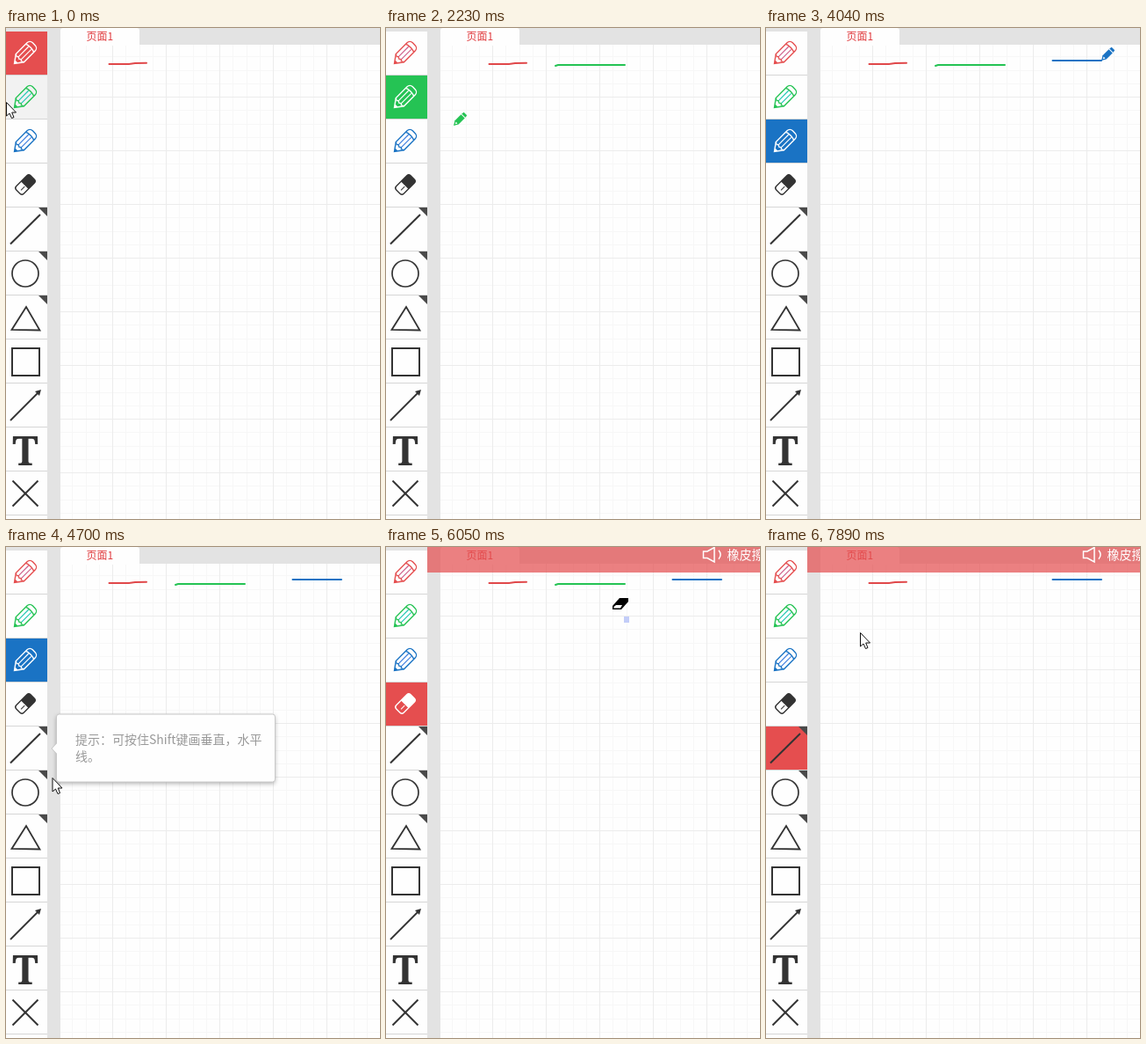
An HTML page with a canvas that plays this animation: 426x558 px, repeating every 8000 ms.

```html
<!DOCTYPE html>
<html lang="zh-CN">
<head>
<meta charset="utf-8">
<title>画板工具</title>
<style>
html, body { margin: 0; width: 100%; height: 100%; overflow: hidden; background: #e3e3e3; }
canvas { display: block; }
</style>
</head>
<body>
<canvas id="stage" width="426" height="558"></canvas>
<script>
const ctx = document.getElementById('stage').getContext('2d');
const LOOP = 8000, FIRST_STEP = 310, STEP = 136.4;
const RED = '#e54e4f', GREEN = '#25c354', BLUE = '#1a73c4', DARK = '#333';
const CJK = '"Noto Sans CJK SC", "Noto Sans CJK", sans-serif';

// Moments of the story, counted in steps
const PICK_GREEN = 2, GREEN_START = 8, GREEN_END = 12, PICK_BLUE = 18, BLUE_START = 24, BLUE_END = 28,
      HOVER_LINE = 32, PICK_ERASER = 38, ERASE = 45, HOVER_AGAIN = 48, PICK_LINE = 51;

// Places the pointer passes; it eases from one to the next
const stops = [
  { step: 0, x: 0, y: 84 },
  { step: PICK_GREEN, x: 14, y: 84 },
  { step: GREEN_START, x: 193, y: 42 },
  { step: GREEN_END, x: 272, y: 42 },
  { step: 13, x: 320, y: 55 },
  { step: 15, x: 77, y: 111 },
  { step: PICK_BLUE, x: 30, y: 132 },
  { step: 22, x: 347, y: 35 },
  { step: BLUE_START, x: 326, y: 37 },
  { step: BLUE_END, x: 382, y: 37 },
  { step: HOVER_LINE, x: 42, y: 226 },
  { step: 33, x: 52.5, y: 262 },
  { step: 35, x: 56, y: 364 },
  { step: PICK_ERASER, x: 30, y: 182 },
  { step: 43, x: 267, y: 65 },
  { step: ERASE, x: 258, y: 45 },
  { step: 49, x: 36, y: 243 },
  { step: PICK_LINE, x: 34, y: 236 },
  { step: 56, x: 107, y: 97 }
];

const clamp = v => Math.min(1, Math.max(0, v));
const smooth = p => p * p * (3 - 2 * p);

function pointerAt(step) {
  const i = stops.findIndex(s => s.step > step);
  if (i < 0) return stops[stops.length - 1];
  const a = stops[i - 1], b = stops[i];
  const p = smooth((step - a.step) / (b.step - a.step));
  return { x: a.x + (b.x - a.x) * p, y: a.y + (b.y - a.y) * p };
}

// Opacity of something that fades in and out over one step
const visible = (step, from, to) => clamp(Math.min(step - from, to - step));

function rect(x, y, w, h, color) {
  ctx.fillStyle = color;
  ctx.fillRect(x, y, w, h);
}

function trace(points, closed) {
  ctx.beginPath();
  points.forEach(([x, y]) => ctx.lineTo(x, y));
  if (closed) ctx.closePath();
}

function stroke(color, width) {
  ctx.strokeStyle = color;
  ctx.lineWidth = width;
  ctx.stroke();
}

function line(points, color, width = 2, closed = false) {
  trace(points, closed);
  stroke(color, width);
}

function polygon(points, color) {
  trace(points, true);
  ctx.fillStyle = color;
  ctx.fill();
}

function roundBox(x, y, w, h, radius, color) {
  ctx.beginPath();
  ctx.roundRect(x, y, w, h, radius);
  ctx.fillStyle = color;
  ctx.fill();
}

function text(str, x, y, font, color) {
  ctx.font = font;
  ctx.fillStyle = color;
  ctx.fillText(str, x, y);
}

function placed(x, y, angle, draw) {
  ctx.save();
  ctx.translate(x, y);
  ctx.rotate(angle);
  draw();
  ctx.restore();
}

function drawGrid(gap, color) {
  for (let x = 121 - 61; x < 426; x += gap) if (x > 62) rect(Math.round(x), 19, 1, 539, color);
  for (let y = 78 - 61; y < 558; y += gap) if (y > 19) rect(62, Math.round(y), 364, 1, color);
}

function drawPage() {
  rect(0, 0, 426, 558, '#e3e3e3');
  rect(62, 19, 364, 539, '#fefefe');
  drawGrid(15.25, '#f7f7f7');
  drawGrid(61, '#ececec');
  roundBox(62, 0, 90, 20, [3, 3, 0, 0], '#fefefe');
  text('页面1', 91.5, 13.5, '12px ' + CJK, '#e0393c');
}

function pencilIcon(y, color, inner) {
  placed(9.5, y + 12.5, -Math.PI / 4, () => {
    for (const v of [-2.2, 2.2]) line([[9, v], [25, v]], inner, 1.2);
    line([[9, -6.5], [7.5, -3.5], [9, -2.2], [7.5, 0], [9, 2.2], [7.5, 3.5], [9, 6.5]], color, 1.2);
    ctx.beginPath();
    ctx.moveTo(0, 0);
    ctx.lineTo(9, -6.5);
    ctx.arcTo(31.5, -6.5, 31.5, 0, 4.5);
    ctx.arcTo(31.5, 6.5, 9, 6.5, 4.5);
    ctx.lineTo(9, 6.5);
    ctx.closePath();
    ctx.moveTo(25, -6.5);
    ctx.quadraticCurveTo(27, 0, 25, 6.5);
    stroke(color, 1.4);
    polygon([[0, 0], [3.5, -2.3], [3.5, 2.3]], color);
  });
}

function eraserIcon(color, fill) {
  placed(22, 178, -Math.PI / 4, () => {
    roundBox(-11.5, -6, 23, 12, 3, fill);
    stroke(color, 1.4);
    roundBox(-1, -6, 12.5, 12, [0, 3, 3, 0], color);
    line([[-8, 1], [-2, 1]], color, 1);
  });
}

function drawToolbar(selected, hovered) {
  const pens = [RED, GREEN, BLUE], inners = ['#d0608c', '#25c8b4', '#3f7fe0'];
  rect(0, 4, 47, 554, '#fefefe');
  if (hovered >= 0) rect(0, 4 + hovered * 50, 47, 49, '#f2f2f2');
  rect(0, 4 + selected * 50, 47, 49, pens[selected] || RED);
  for (let i = 1; i < 12; i++) rect(0, 3 + i * 50, 47, 1, '#d6d6d6');

  pens.forEach((color, i) => {
    const on = selected === i;
    pencilIcon(28 + i * 50, on ? '#fff' : color, on ? '#fff' : inners[i]);
  });
  eraserIcon(selected === 3 ? '#fff' : DARK, selected === 3 ? RED : '#fff');
  for (const y of [204, 254, 304]) polygon([[37, y], [47, y], [47, y + 10]], '#4a4a4a');

  line([[5, 245.5], [39, 212]], DARK);
  ctx.beginPath();
  ctx.arc(22, 279, 15, 0, Math.PI * 2);
  stroke(DARK, 1.7);
  line([[23, 317], [38.5, 343.5], [6.5, 343]], DARK, 1.8, true);
  line([[7, 364], [38, 364], [38, 395], [7, 395]], DARK, 2, true);
  line([[5, 446], [37, 414]], DARK, 1.8);
  polygon([[40, 411], [38, 418], [33, 413]], DARK);
  ctx.textAlign = 'center';
  text('T', 22, 496.5, 'bold 45px "Noto Serif", serif', DARK);
  ctx.textAlign = 'left';
  line([[7.5, 514.5], [36.5, 543.5]], DARK);
  line([[36.5, 514.5], [7.5, 543.5]], DARK);
}

function drawStrokes(step) {
  const penX = end => pointerAt(Math.min(step, end)).x;
  ctx.save();
  ctx.lineCap = 'round';
  line([[117.5, 41], [140, 41], [147, 40], [160, 39.8]], '#e0484a');
  if (step > GREEN_START && step < ERASE) line([[193, 43], [196, 42], [penX(GREEN_END), 42]], GREEN);
  if (step > BLUE_START) line([[326.5, 37], [penX(BLUE_END), 37]], BLUE);
  ctx.restore();
}

function drawBanner(step) {
  const shown = clamp((step - PICK_ERASER) / 2);
  placed(0, -29 * (1 - shown), 0, () => {
    rect(47, 0, 379, 29, 'rgba(229,78,79,.71)');
    line([[361.5, 5], [366, 5], [374, .5], [374, 17], [366, 12.5], [361.5, 12.5]], '#fff', 1.5, true);
    ctx.beginPath();
    ctx.arc(374, 8.7, 7, -.8, .8);
    ctx.stroke();
    text('橡皮擦', 388.5, 14, '14px ' + CJK, '#fff');
  });
}

function drawTip(amount) {
  if (amount <= 0) return;
  const scale = .88 + .12 * amount;
  placed(57, 229, 0, () => {
    ctx.scale(scale, scale);
    ctx.shadowColor = 'rgba(0,0,0,.3)';
    ctx.shadowBlur = 5;
    ctx.shadowOffsetY = 2;
    roundBox(.5, -39, 249, 77, 3, '#fefefe');
    ctx.shadowColor = 'transparent';
    stroke('#c8c8c8', 1);
    polygon([[2, -7], [-5, 0], [2, 7]], '#fefefe');
    line([[.5, -6], [-5, 0], [.5, 6]], '#c8c8c8', 1);
    ctx.globalAlpha = amount * amount;
    text('提示：可按住Shift键画垂直，水平', 22, -5, '14px ' + CJK, '#999');
    text('线。', 22, 14, '14px ' + CJK, '#999');
  });
}

function outlined(points) {
  polygon(points, '#fff');
  line(points, '#111', 1, true);
}

const cursors = {
  arrow() {
    outlined([[.5, .5], [.5, 16], [4, 13], [6.5, 18.5], [9, 17.5], [6.7, 12], [11.5, 12]]);
  },
  hand() {
    outlined([[-1.5, 1.5], [0, .5], [1.5, 1.5], [1.5, 8], [9, 10], [9.5, 17], [7.5, 23.5],
              [-2, 23.5], [-7, 13], [-5.5, 11.5], [-1.5, 15]]);
    for (const x of [2, 4.5, 7]) line([[x, 8.5], [x, 12]], '#111', 1);
  },
  pencil(color) {
    ctx.rotate(-Math.PI / 4);
    polygon([[0, 0], [5, -3], [15, -3], [15, 3], [5, 3]], color);
    polygon([[16, -3], [19, -2.5], [19, 2.5], [16, 3]], color);
    polygon([[2.5, 0], [5, -1.3], [5, 1.3]], '#fff');
  },
  eraser() {
    polygon([[-1, -7], [9, -7], [9, -3], [1, 6], [-9, 6], [-9, 2]], '#000');
    polygon([[-7.5, 3], [-5, 1], [2, 1], [0, 4.5], [-7.5, 4.5]], '#fff');
    rect(4, 14, 6, 7, '#c3cdf8');
  }
};

function drawCursor(x, y, tool) {
  let kind = 'arrow';
  if (x >= 1 && x < 47) kind = 'hand';
  else if (x >= 62 && tool < 3) kind = 'pencil';
  else if (x >= 62 && tool === 3) kind = 'eraser';
  placed(x, y, 0, () => cursors[kind]([RED, GREEN, BLUE][tool]));
}

function render(time) {
  const step = Math.max(0, Math.floor((time - FIRST_STEP) / STEP) + 1);
  const tool = [PICK_GREEN, PICK_BLUE, PICK_ERASER, PICK_LINE].filter(pick => step >= pick).length;
  const { x, y } = pointerAt(step);
  drawPage();
  drawStrokes(step);
  drawToolbar(tool, x < 47 ? Math.floor((y - 4) / 50) : -1);
  drawBanner(step);
  drawTip(visible(step, HOVER_LINE, 35) + visible(step, HOVER_AGAIN + .2, PICK_LINE + 1.5));
  drawCursor(x, y, tool);
}

const startTime = performance.now();
function tick() {
  render((performance.now() - startTime) % LOOP);
  requestAnimationFrame(tick);
}
tick();
</script>
</body>
</html>
```
